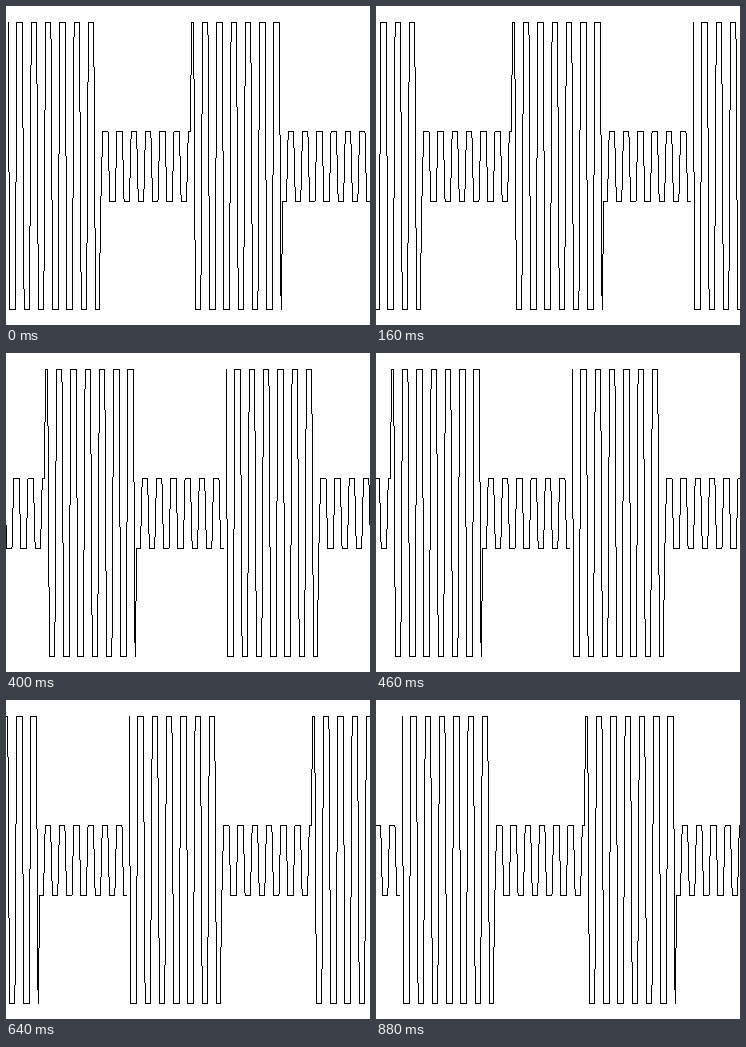
Animation, 364 px wide and 319 px high, one loop 0.94 s. Source, as an HTML page with a canvas:

```html
<!DOCTYPE html>
<html lang="en">
<head>
<meta charset="utf-8">
<title>Scrolling modulated square wave</title>
<style>
html, body { margin: 0; width: 100%; height: 100%; overflow: hidden; background: #fff; }
canvas { display: block; }
</style>
</head>
<body>
<canvas id="stage" width="364" height="319"></canvas>
<script>
const W = 364, H = 319, STEPS = 15, LOOP = 940, HOLD = 100, STEP_MS = 60;
const START_X = 2.07, SAMPLE_DX = 1.7844, SAMPLES = 204;
const ENVELOPE_HALF = 51.2, CARRIER_HALF = 4; // in samples
const LEVELS = [{ top: 16, bottom: 303 }, { top: 125, bottom: 195 }];

const isOdd = n => n % 2 !== 0;

function sample(i) {
  const level = LEVELS[Math.floor(i / ENVELOPE_HALF) % 2];
  const high = isOdd(Math.floor((i - 1) / CARRIER_HALF));
  return { x: START_X + i * SAMPLE_DX, y: high ? level.top : level.bottom };
}

// Unsmoothed one-pixel line: a flat run, or one pixel in every row.
function segment(g, a, b) {
  if (a.y === b.y) {
    const left = Math.floor(a.x);
    g.fillRect(left, a.y, Math.floor(b.x) - left + 1, 1);
    return;
  }
  const slope = (b.x - a.x) / (b.y - a.y);
  const last = Math.max(a.y, b.y);
  for (let y = Math.min(a.y, b.y); y <= last; y++) {
    g.fillRect(Math.floor(a.x + (y - a.y) * slope), y, 1, 1);
  }
}

function makeWave() {
  const wave = document.createElement('canvas');
  wave.width = W;
  wave.height = H;
  const g = wave.getContext('2d');
  g.fillStyle = '#000';
  for (let i = 1; i < SAMPLES; i++) segment(g, sample(i - 1), sample(i));
  return wave;
}

const ctx = document.getElementById('stage').getContext('2d');
const wave = makeWave();

function draw(now) {
  const t = now % LOOP;
  const step = t < HOLD ? 0 : 1 + Math.floor((t - HOLD) / STEP_MS);
  const shift = Math.round(step * W / STEPS);
  ctx.fillStyle = '#fff';
  ctx.fillRect(0, 0, W, H);
  ctx.drawImage(wave, -shift, 0);
  ctx.drawImage(wave, W - shift, 0);
}

const begin = performance.now();
function tick() {
  draw(performance.now() - begin);
  requestAnimationFrame(tick);
}
tick();
</script>
</body>
</html>
```
